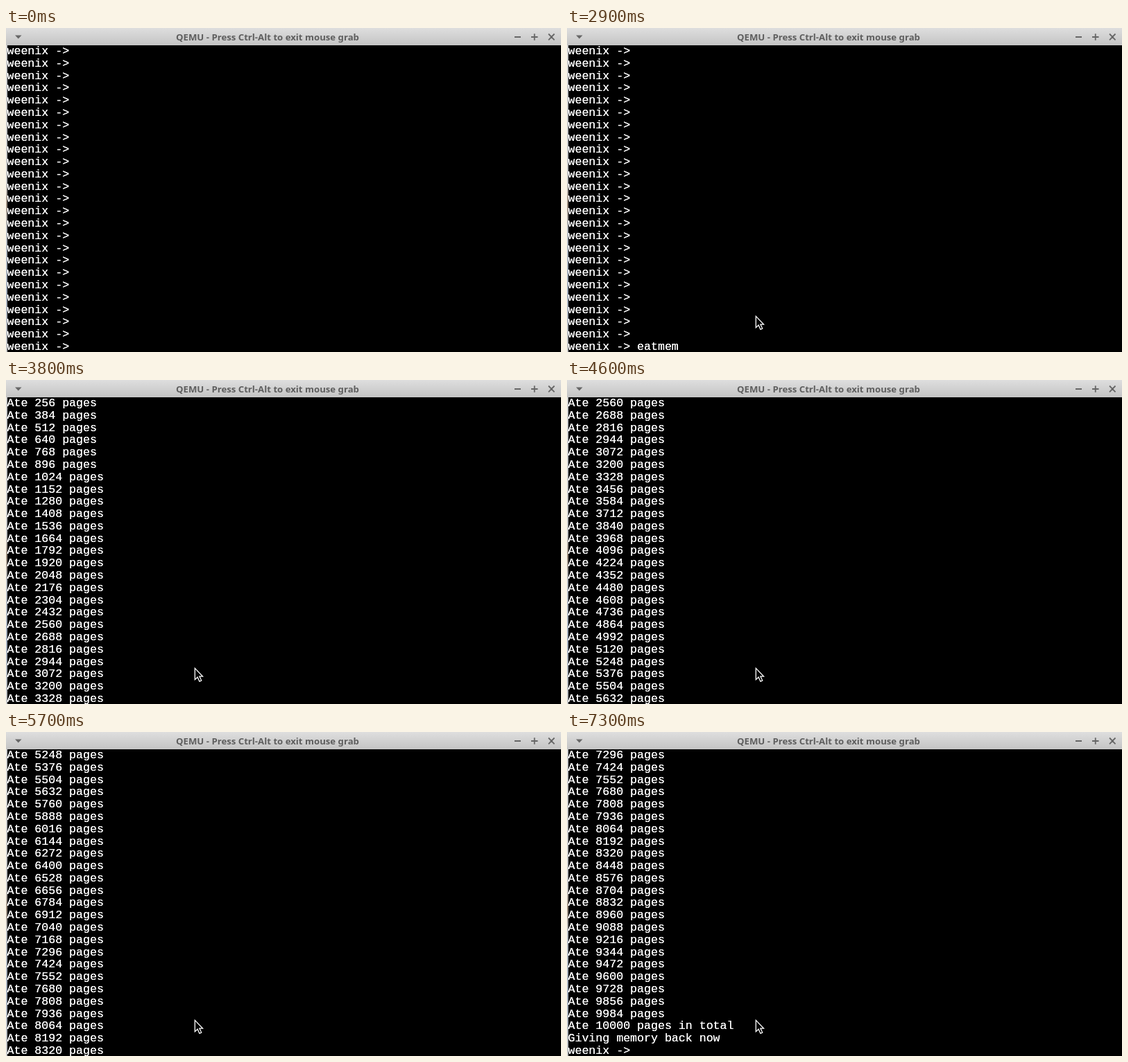
An HTML page for the animation above (7.4 s loop, 800 by 468 pixels).

```html
<!DOCTYPE html>
<html lang="en">
<head>
<meta charset="utf-8">
<title>Terminal</title>
<style>
  html, body { margin: 0; width: 100%; height: 100%; overflow: hidden; background: #000; }
  svg { display: block; width: 800px; height: 468px; }
  .title { font: bold 13.2px "Noto Sans", "Open Sans", sans-serif; fill: #5e5e5e; }
  /* The shadow thickens only the vertical strokes, as in a console font. */
  .screen {
    font: 16.6px "Liberation Mono", "DejaVu Sans Mono", monospace;
    fill: #fff; white-space: pre;
    filter: drop-shadow(.9px 0 0 #fff);
  }
</style>
</head>
<body>
<svg viewBox="0 0 800 468">
  <defs>
    <linearGradient id="bar" x2="0" y2="1">
      <stop offset="0" stop-color="#dedede"/>
      <stop offset="1" stop-color="#c4c4c4"/>
    </linearGradient>
    <linearGradient id="edge" x2="0" y2="1">
      <stop offset="0" stop-color="#cecece"/>
      <stop offset=".45" stop-color="#c4c4c4"/>
      <stop offset=".52" stop-color="#a09080"/>
      <stop offset=".6" stop-color="#b8bcc0"/>
      <stop offset=".8" stop-color="#a4aebc"/>
      <stop offset="1" stop-color="#c4c4c4"/>
    </linearGradient>
  </defs>
  <rect width="800" height="468"/>
  <rect y="24" width="2" height="444" fill="url(#edge)"/>
  <rect width="800" height="25" fill="url(#bar)"/>
  <path d="M13 10.5h9.5l-4.75 5z" fill="#666"/>
  <path d="M733 13h9M757 13h9.5M761.75 8.2v9.6M782 8.5l8.5 8.8M790.5 8.5l-8.5 8.8"
        fill="none" stroke="#666" stroke-width="1.8"/>
  <text class="title" x="245" y="18">QEMU - Press Ctrl-Alt to exit mouse grab</text>
  <g class="screen" id="screen"></g>
  <path id="pointer" d="M272.3 416.3v16.4l3.8-3.5 2.8 6.2 2.8-1.3-2.8-6h4.6z"
        stroke="#fff" stroke-width="1.3"/>
</svg>
<script>
const LOOP = 7400, STEP = 100, ROWS = 25, ROW_HEIGHT = 17.79;
const PROMPT = 'weenix ->', COMMAND = 'eatmem';
const TYPING_START = 1900;

// [time in ms, lines printed since the command was entered]
const progress = [[2900, 0], [3800, 26], [4600, 44], [5200, 56], [6100, 72], [6500, 80], [7100, 80], [7200, 81]];

const output = [
  ...Array.from({ length: 78 }, (_, i) => `Ate ${(i + 1) * 128} pages`),
  'Ate 10000 pages in total',
  'Giving memory back now',
  PROMPT
];

const screen = document.getElementById('screen');
const pointer = document.getElementById('pointer');
const rows = Array.from({ length: ROWS }, (_, i) => {
  const row = document.createElementNS('http://www.w3.org/2000/svg', 'text');
  row.setAttribute('x', 1.5);
  row.setAttribute('y', 38 + i * ROW_HEIGHT);
  return screen.appendChild(row);
});

function printedLines(t) {
  const next = progress.findIndex(([time]) => time > t);
  if (next === 0) return 0;
  if (next < 0) return output.length;
  const [t0, n0] = progress[next - 1], [t1, n1] = progress[next];
  return Math.round(n0 + (n1 - n0) * (t - t0) / (t1 - t0));
}

function render(now) {
  const t = Math.floor((now % LOOP) / STEP) * STEP;
  const typed = Math.max(0, (t - TYPING_START) / STEP + 1);
  const lines = [
    ...Array(ROWS - 1).fill(PROMPT),
    `${PROMPT} ${COMMAND.slice(0, typed)}`,
    ...output
  ];
  const top = printedLines(t);
  rows.forEach((row, i) => {
    const line = lines[top + i];
    if (row.textContent !== line) row.textContent = line;
  });
  pointer.style.display = t < STEP ? 'none' : '';
}

let start;
function tick(now) {
  start ??= now;
  render(now - start);
  requestAnimationFrame(tick);
}
render(0);
requestAnimationFrame(tick);
</script>
</body>
</html>
```
